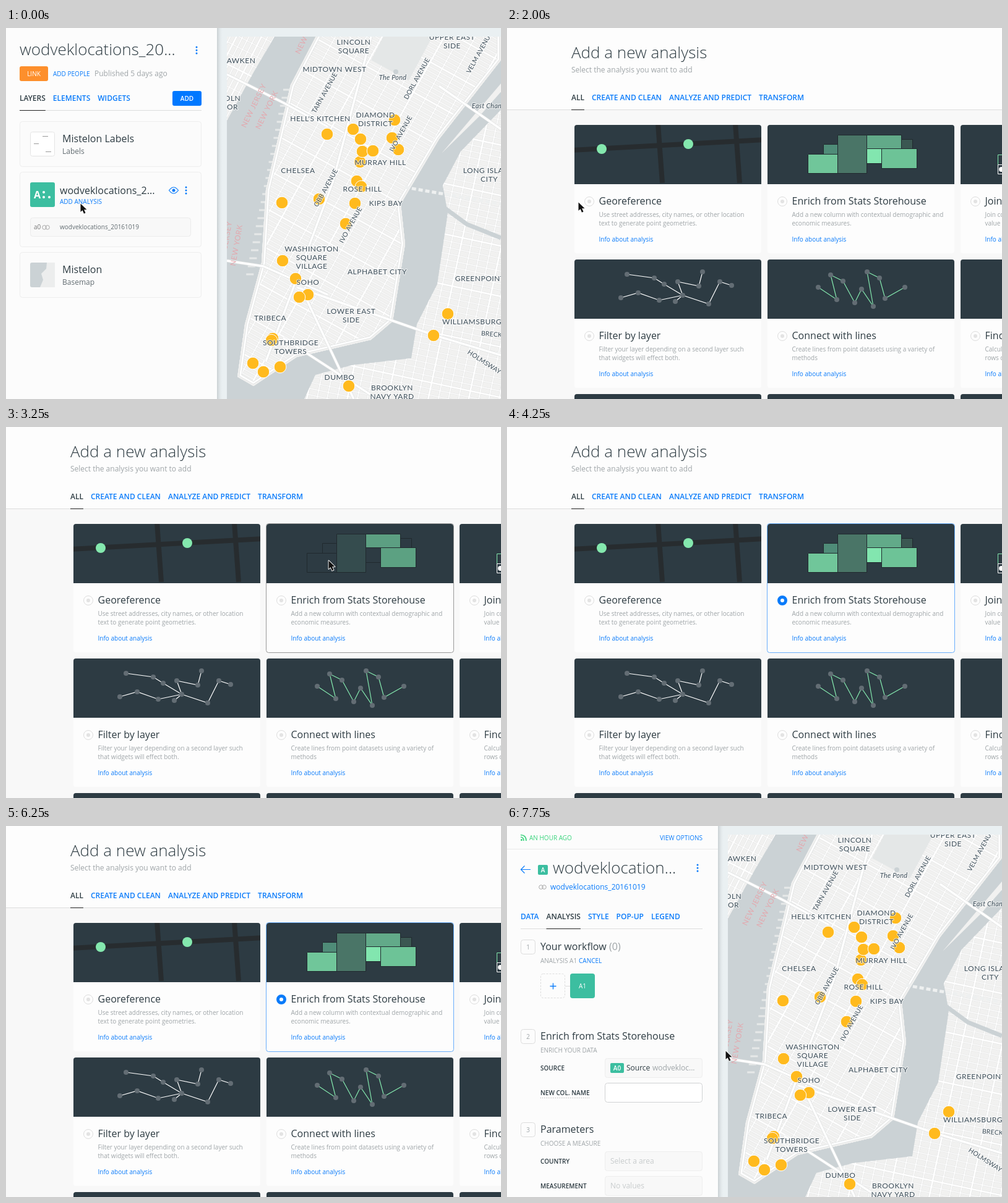
An HTML page with a canvas that plays this animation: 800 px wide and 601 px high, repeating every 8000 ms.

```html
<!DOCTYPE html>
<html lang="en">
<head>
<meta charset="utf-8">
<title>Add an analysis</title>
<style>
  html, body { margin: 0; width: 100%; height: 100%; overflow: hidden; }
  canvas { display: block; }
</style>
</head>
<body>
<canvas id="stage" width="800" height="601"></canvas>
<script>
const W = 800, H = 601, LOOP = 8000, STEP = 250;
const BLUE = '#0a7bfa', INK = '#2e3c43', MUTED = '#9fa5a8', FAINT = '#c8cccd',
      TEAL = '#3cbea0', DARK = '#2d3b43', MINT = '#84e8ae', RULE = '#dcdddd',
      WATER = '#cbd2d5', LAND = '#f1f1f0', PLACE = '#3f505b', BORDER = '#e3a8ae';
const DATASET = 'wodveklocations_20161019';
const stage = document.getElementById('stage').getContext('2d');
let g = stage;

// Drawing helpers
function text(str, x, y, size = 12, color = INK, weight = 400, align = 'left') {
  g.font = `${weight} ${size}px "Open Sans", sans-serif`;
  g.fillStyle = color;
  g.textAlign = align;
  g.fillText(str, x, y);
}
function rect(x, y, w, h, fill, r = 0, border) {
  if (fill) {
    g.beginPath();
    g.roundRect(x, y, w, h, r);
    g.fillStyle = fill;
    g.fill();
  }
  if (border) {
    g.beginPath();
    g.roundRect(x + .5, y + .5, w - 1, h - 1, r);
    g.strokeStyle = border;
    g.lineWidth = 1;
    g.stroke();
  }
}
function circle(x, y, r, fill, border, width = 1) {
  g.beginPath();
  g.arc(x, y, r, 0, 7);
  if (fill) { g.fillStyle = fill; g.fill(); }
  if (border) { g.strokeStyle = border; g.lineWidth = width; g.stroke(); }
}
function path(d, color, width = 1) {
  g.strokeStyle = color;
  g.lineWidth = width;
  g.stroke(new Path2D(d));
}
function area(d, color) {
  g.fillStyle = color;
  g.fill(new Path2D(d));
}
function isolated(draw) {
  g.save();
  draw();
  g.restore();
}
function faded(alpha, draw) {
  isolated(() => { g.globalAlpha *= alpha; draw(); });
}
function menuDots(x, y) {
  for (const d of [-5, 0, 5]) circle(x, y + d, 1.5, BLUE);
}
// Lays labels out from left to right with an even gap
function tabs(labels, x, y, active) {
  labels.forEach((label, i) => {
    text(label, x, y, 12, i === active ? INK : BLUE, 600);
    const width = g.measureText(label).width;
    if (i === active) rect(x, y + 15, width, 1, '#222');
    x += width + 12;
  });
}
function linkedCircles(x, y) {
  circle(x, y, 3.3, null, '#aaa');
  circle(x + 5, y, 3.3, null, '#aaa');
}

// Map
const jersey = 'M340 0H442L400 72 357 150H340Z';
const manhattan = 'M508 0L460 92 420 262 413 380 386 480 374 565 400 580 470 533 590 505 625 475 645 350 638 285 700 180 800 52V0Z';
const brooklyn = 'M810 122L735 200 706 255 714 300 697 415 664 480 655 535 560 546 500 562 478 610H810Z';
const island = 'M704 203L765 143 810 92V78Z';

function streets(land, degrees, across, along) {
  isolated(() => {
    g.clip(new Path2D(land));
    g.translate(550, 300);
    g.rotate(degrees * Math.PI / 180);
    for (const [color, casing] of [['#e0e1e1', 1], ['#fff', 0]]) {
      for (let i = -60; i <= 60; i++) {
        const x = i * across, y = i * along;
        path(`M${x} -600V600`, color, casing + (i % 4 ? 1.6 : 2.6));
        path(`M-600 ${y}H600`, color, casing + (i % 8 ? 1.3 : 2.6));
      }
    }
  });
}
function shoreRoad(land) {
  isolated(() => {
    g.clip(new Path2D(land));
    path(land, '#dfe1e1', 13);
    path(land, '#fff', 11.5);
    path(land, '#dfe1e1', 6);
    path(land, LAND, 4.5);
  });
}
function road(d) {
  path(d, '#dfe1e1', 5);
  path(d, '#fff', 3.5);
}
function place(str, x, y, size = 12, degrees = 0, color = PLACE, style = '') {
  isolated(() => {
    g.translate(x, y);
    g.rotate(degrees * Math.PI / 180);
    g.font = `${style} ${size}px Lato, sans-serif`;
    g.letterSpacing = size < 12 ? '.2px' : '.5px';
    g.textAlign = 'center';
    g.lineJoin = 'round';
    g.lineWidth = 2.5;
    g.strokeStyle = 'rgba(250,250,250,.6)';
    g.fillStyle = color;
    str.split('\n').forEach((line, i) => {
      if (color === PLACE) g.strokeText(line, 0, i * 14 + 3.5);
      g.fillText(line, 0, i * 14 + 3.5);
    });
  });
}
const avenue = (name, x, y) => place(name + ' AVENUE', x, y, 10.5, -61);

const sites = [[519,172],[561,164],[573,180],[628,149],[624,178],[634,197],[572,217],[576,200],
  [593,199],[567,248],[574,257],[506,277],[446,283],[564,284],[549,317],[447,377],[468,406],
  [488,432],[474,436],[431,503],[429,506],[399,543],[416,557],[443,549],[554,580],[714,463],[691,498]];

function drawMap() {
  rect(0, 0, W, H, '#eaf0f2');
  isolated(() => {
    g.beginPath();
    g.rect(357, 14, 443, 587);
    g.clip();
    rect(0, 0, W, H, WATER);
    for (let y = 100; y < 400; y += 13) path(`M${462 - (y - 90) * .2} ${y}h-12`, '#e6e8e8', 3);
    for (const land of [jersey, manhattan, brooklyn, island]) area(land, LAND);

    streets(jersey, 27, 9, 16);
    streets(brooklyn, 12, 16, 10);
    streets(manhattan, 29, 22, 7);
    area('M590 52L651 85 689 14H610Z', '#e4e7e7');
    circle(630, 71, 4, WATER);
    path('M704 288L745 318 800 340', WATER, 7);
    shoreRoad(manhattan);

    road('M357 75L450 122 520 160');
    road('M357 377L416 386 520 432');
    road('M700 94L800 164');
    road('M470 420L690 497 800 530');
    road('M486 440L562 601');
    road('M448 502L600 601');
    road('M590 14L528 250 420 540');
    g.setLineDash([7, 4]);
    path('M645 258L800 285', '#eef0f0', 5);
    g.setLineDash([]);

    place('NEW JERSEY', 401, 126, 12, -64, BORDER);
    place('NEW YORK', 422, 133, 12, -64, BORDER);
    place('NEW', 478, 28, 12, -64, BORDER);
    place('NEW YORK', 373, 352, 12, -80, BORDER);
    place('JERSEY', 358, 335, 12, -80, BORDER);

    for (const [x, y] of sites) circle(x, y, 9.8, '#ffba1e', '#fff');

    place('LINCOLN\nSQUARE', 562, 23);
    place('UPPER EAST\nSIDE', 721, 15);
    place('AWKEN', 380, 53);
    place('OLN\nOR', 366, 114);
    place('MIDTOWN WEST', 531, 67);
    place("HELL'S KITCHEN", 508, 147);
    place('DIAMOND\nDISTRICT', 597, 141);
    place('MURRAY HILL', 605, 218);
    place('CHELSEA', 472, 231);
    place('ROSE HILL', 576, 261);
    place('KIPS BAY', 614, 284);
    place('LONG ISLAND\nCITY', 781, 231);
    place('WASHINGTON\nSQUARE\nVILLAGE', 494, 358);
    place('ALPHABET CITY', 600, 395);
    place('SOHO', 488, 412);
    place('GREENPOINT', 766, 406);
    place('LOWER EAST\nSIDE', 558, 459);
    place('TRIBECA', 427, 470);
    place('WILLIAMSBURG', 753, 476);
    place('SOUTHBRIDGE\nTOWERS', 460, 510);
    place('DUMBO', 539, 566);
    place('BROOKLYN\nNAVY YARD', 624, 583);
    place('The Pond', 625, 80, 11, 0, PLACE, 'italic');
    place('East Channel', 784, 126, 11, 0, PLACE, 'italic');
    avenue('TARN', 515, 105);
    avenue('OBB', 517, 259);
    avenue('IVO', 638, 171);
    avenue('IVO', 557, 319);
    avenue('DORL', 664, 82);
    avenue('VELM', 765, 40);
    place('HOLMSWAY', 773, 541, 10.5, 33);
    place('BRECK', 785, 496, 10.5, 5);
  });

  const shadow = g.createLinearGradient(341, 0, 351, 0);
  shadow.addColorStop(0, '#c9cfd2');
  shadow.addColorStop(1, '#eaf0f200');
  rect(341, 0, 10, H, shadow);
}

const mapLayer = document.createElement('canvas');
mapLayer.width = W;
mapLayer.height = H;
g = mapLayer.getContext('2d');
drawMap();
g = stage;

function panelBase() {
  g.drawImage(mapLayer, 0, 0);
  rect(0, 0, 341, H, '#fcfcfc');
}

// Layer list; hover runs from 0 to 1
function layerPanel(hover) {
  panelBase();
  text('wodveklocations_20...', 22, 44, 26, INK, 300);
  menuDots(308, 36);
  rect(22, 62, 46, 24, '#fd8f2c', 3);
  text('LINK', 45, 78, 10, '#fff', 400, 'center');
  text('ADD PEOPLE', 76, 78, 10, BLUE);
  text('Published 5 days ago', 143, 78, 12, MUTED);
  rect(22, 133, 294, 1, RULE);
  tabs(['LAYERS', 'ELEMENTS', 'WIDGETS'], 22, 118, 0);
  rect(269, 102, 47, 24, '#0078ff', 3);
  text('ADD', 292.5, 118, 10, '#fff', 600, 'center');

  for (const [y, h] of [[151, 74], [233, 122], [363, 74]]) rect(22, y, 294, h, '#fbfbfb', 4, '#eee');

  rect(39, 168, 40, 40, '#fff', 3, '#e4e4e4');
  path('M59 175.5h9M45 187.5h8M64 200.5h9', '#999');
  text('Mistelon Labels', 91, 185, 16);
  text('Labels', 91, 204, 12, '#636d72');

  faded(hover, () => {
    rect(22, 233, 294, 122, '#fff', 4, '#999');
    for (const x of [9, 13]) for (const y of [266, 270, 274]) circle(x, y, 1.1, '#999');
  });
  rect(39, 250, 40, 40, TEAL, 3);
  text('A', 45, 276, 16, '#fff', 700);
  for (const [x, y] of [[61, 266], [61, 274], [70, 274]]) circle(x, y, 2, '#fff');
  text('wodveklocations_2...', 87, 269, 16);
  text('ADD ANALYSIS', 87, 285, 10, BLUE);
  path('M263.5 263Q271 253 278.5 263Q271 273 263.5 263Z', BLUE, 1.2);
  circle(271, 263, 2.5, BLUE);
  menuDots(291, 263);
  rect(39, 307, 260, 31, '#f8f8f8', 4, '#ececec');
  text('a0', 45, 326, 10, '#777');
  linkedCircles(62, 323);
  text(DATASET, 87, 326, 10, '#636d72');

  rect(39, 380, 40, 40, WATER, 3);
  area('M66 380H79V420H55L60 408 57 398 65 390Z', '#eceded');
  text('Mistelon', 91, 397, 16);
  text('Basemap', 91, 416, 12, '#636d72');
}

// Blocks in order of appearance; each one waits longer than the one before
const blocks = [
  [581, 173, 56, 22, '#62aa89'], [605, 195, 57, 32, '#6dc397'], [534, 173, 47, 62, '#4a7567'],
  [581, 195, 24, 24, '#82e6af'], [486, 204, 48, 31, '#70c69a'], [511, 188, 23, 16, '#4f8c78'],
  [637, 180, 18, 15, '#3b5752']
];
function blockArt(t) {
  const building = t >= 2750 && t < 4250;
  blocks.forEach(([x, y, w, h, color], i) => {
    const level = building ? (t - 2800 - 75 * i * i) / 500 : 1;
    faded(Math.min(1, Math.max(0, level)), () => rect(x, y, w, h, color));
    rect(x, y, w + 1, h + 1, null, 0, '#20292e');
  });
}
function roadArt() {
  isolated(() => {
    g.beginPath();
    g.rect(109, 157, 302, 96);
    g.clip();
    path('M105 198L415 181M244 155l7 96M369 155l7 96', '#272c2f', 8);
  });
  circle(153, 196, 8, MINT);
  circle(293, 188, 8, MINT);
}
function graphArt(color, ...lines) {
  path(lines.map(line => 'M' + line).join(''), color, 1.2);
  for (const p of new Set(lines.join(' ').split(' '))) circle(...p.split(',').map(Number), 4, '#636d74');
}
function filterArt() {
  graphArt('#fff',
    '194,399 238,405 254,415 284,433 326,447 344,411 363,417',
    '184,437 212,429 246,441 284,433 272,443',
    '284,433 276,411 310,418 316,395');
}
function connectArt() {
  graphArt(MINT, '503,420 533,440 523,400 543,410 562,445 573,423 592,451 582,395 602,405 611,438 643,420');
}
function joinArt() {
  rect(793, 205, 20, 17, null, 0, MINT);
  rect(793, 221, 20, 16, null, 0, '#fff');
  circle(799, 229, 4, '#fff');
}

// Analysis chooser
const options = [
  ['Georeference', 'Use street addresses, city names, or other location', 'text to generate point geometries.', roadArt],
  ['Enrich from Stats Storehouse', 'Add a new column with contextual demographic and', 'economic measures.', blockArt],
  ['Join columns', 'Join columns from', 'value matching.', joinArt],
  ['Filter by layer', 'Filter your layer depending on a second layer such', 'that widgets will effect both.', filterArt],
  ['Connect with lines', 'Create lines from point datasets using a variety of', 'methods', connectArt],
  ['Find nearest', 'Calculate the', 'rows closest', () => {}]
];
// Opacity of a card's outline: fades in after the pointer enters and out before it has left
function outline(t, enter, leave) {
  return Math.min(1, Math.max(0, Math.min(t - enter + 250, leave - t) / 500));
}
function optionCard([title, line1, line2, art], i, t) {
  const x = 109 + i % 3 * 312, y = 157 + Math.floor(i / 3) * 218;
  const chosen = i === 1 && t >= 3500;
  rect(x, y, 302, 208, '#fdfdfd', 4);
  rect(x, y, 302, 96, DARK, [4, 4, 0, 0]);
  art(t);
  if (chosen) circle(x + 24, y + 124, 5.5, null, BLUE, 5);
  else {
    circle(x + 24, y + 124, 7.5, null, '#dedede');
    circle(x + 24, y + 124, 3, '#e3e3e3');
  }
  text(title, x + 39.5, y + 129, 16);
  text(line1, x + 39.5, y + 149, 10, MUTED);
  text(line2, x + 39.5, y + 163, 10, MUTED);
  text('Info about analysis', x + 39.5, y + 189, 10, BLUE);

  const border = i === 1 ? outline(t, 2750, LOOP) : i === 5 ? outline(t, 5500, 6250) : 0;
  faded(border, () => rect(x - 1, y - 1, 304, 210, null, 4, chosen ? '#6aaefb' : '#999'));
}
function chooser(t) {
  rect(0, 0, W, H, '#f8f8f8');
  rect(0, 0, W, 132, '#fdfdfd');
  text('Add a new analysis', 104, 49, 26, INK, 300);
  text('Select the analysis you want to add', 104, 72, 12, MUTED);
  rect(0, 132, W, 1, RULE);
  tabs(['ALL', 'CREATE AND CLEAN', 'ANALYZE AND PREDICT', 'TRANSFORM'], 104, 117, 0);
  options.forEach((option, i) => optionCard(option, i, t));
  for (const x of [109, 421, 733]) rect(x, 593, 302, 20, DARK, 4);
}

// Analysis settings
function section(number, y, title, caption) {
  rect(22, y, 24, 24, '#fcfcfc', 4, '#ddd');
  text(number, 34, y + 16, 10, MUTED, 400, 'center');
  text(title, 54, y + 17, 16);
  text(caption, 54, y + 38, 10, MUTED);
}
function field(label, y, value, active) {
  text(label, 54, y + 20, 10, INK, 600);
  rect(158, y, 158, 32, active ? '#fff' : '#f8f8f8', 4, active ? '#d0d2d3' : '#eee');
  text(value, 167, y + 20, 12, FAINT);
}
function badge(label, x, y, w, h) {
  rect(x, y, w, h, TEAL, 2);
  text(label, x + w / 2, y + h / 2 + 4, 10, '#fff', 600, 'center');
}
function settingsPanel() {
  panelBase();
  const green = '#3ad47d';
  circle(23.5, 22.5, 1.5, green);
  path('M22 18Q27 18 27 24M22 14.5Q31 14.5 31 24', green, 1.7);
  text('AN HOUR AGO', 36, 23, 10, green);
  text('VIEW OPTIONS', 316, 23, 10, BLUE, 400, 'right');
  rect(0, 37, 341, 1, '#e9e9e9');
  path('M38 70.5H22.5M28.5 64.5l-6 6 6 6', BLUE, 1.2);
  badge('A', 50, 63, 16, 16);
  text('wodveklocation...', 74, 77, 26, INK, 300);
  menuDots(308, 68);
  linkedCircles(55, 99);
  text(DATASET, 70, 103, 12, BLUE);
  rect(22, 166, 294, 1, RULE);
  tabs(['DATA', 'ANALYSIS', 'STYLE', 'POP-UP', 'LEGEND'], 22, 151, 1);

  section('1', 184, 'Your workflow', 'ANALYSIS A1');
  text('(0)', 165, 201, 16, MUTED);
  text('CANCEL', 116, 222, 10, BLUE);
  g.setLineDash([3, 2]);
  rect(54, 239, 40, 40, null, 4, '#ddd');
  g.setLineDash([]);
  path('M69.5 259.5h10M74.5 254.5v10', BLUE, 1.3);
  rect(94, 259, 8, 1, '#ddd');
  rect(102, 239, 40, 40, TEAL, 4);
  text('A1', 122, 263, 10, '#fff', 400, 'center');

  section('2', 329, 'Enrich from Stats Storehouse', 'ENRICH YOUR DATA');
  field('SOURCE', 376, '');
  badge('A0', 167, 384, 22, 16);
  text('Source', 193, 396, 12);
  text('wodvekloc...', 235, 396, 12, MUTED);
  field('NEW COL. NAME', 416, '', true);
  g.setLineDash([1, 2]);
  path('M54 440.5H133', '#aaa');
  g.setLineDash([]);

  section('3', 480, 'Parameters', 'CHOOSE A MEASURE');
  field('COUNTRY', 527, 'Select a area');
  field('MEASUREMENT', 567, 'No values');
}

// Pointer glides; it is hidden once a glide's visible time is over
const glides = [
  { start: 1000, end: 1500, until: 2500, from: [120, 284], to: [115, 282] },
  { start: 2500, end: 3250, until: 3500, from: [121, 284], to: [521, 216] },
  { start: 7500, end: 7750, until: LOOP, from: [579, 446], to: [353, 364] }
];
function pointer(t) {
  const glide = glides.find(m => t < m.until);
  if (t < glide.start && glide !== glides[0]) return;
  const p = Math.min(1, Math.max(0, (t - glide.start) / (glide.end - glide.start)));
  const eased = 1 - (1 - p) ** 4;
  const [x, y] = glide.from.map((v, i) => Math.round(v + (glide.to[i] - v) * eased));
  isolated(() => {
    g.translate(x, y);
    g.lineJoin = 'round';
    const arrow = 'M.5 .5V14L3.6 11.2 6 16.7 8.5 15.6 6.1 10.3H10.5Z';
    path(arrow, '#fff', 1.8);
    area(arrow, '#111');
  });
}

function render(t) {
  if (t < 2000) layerPanel(Math.min(1, Math.max(0, (t - 1000) / 500)));
  else if (t < 7250) chooser(t);
  else {
    settingsPanel();
    if (t < 7500) faded(.3, () => chooser(t));
  }
  pointer(t);
}

let shown = -1;
const begin = performance.now();
function frame() {
  const t = Math.floor((performance.now() - begin) % LOOP / STEP) * STEP;
  if (t !== shown) render(shown = t);
  requestAnimationFrame(frame);
}
frame();
</script>
</body>
</html>
```
